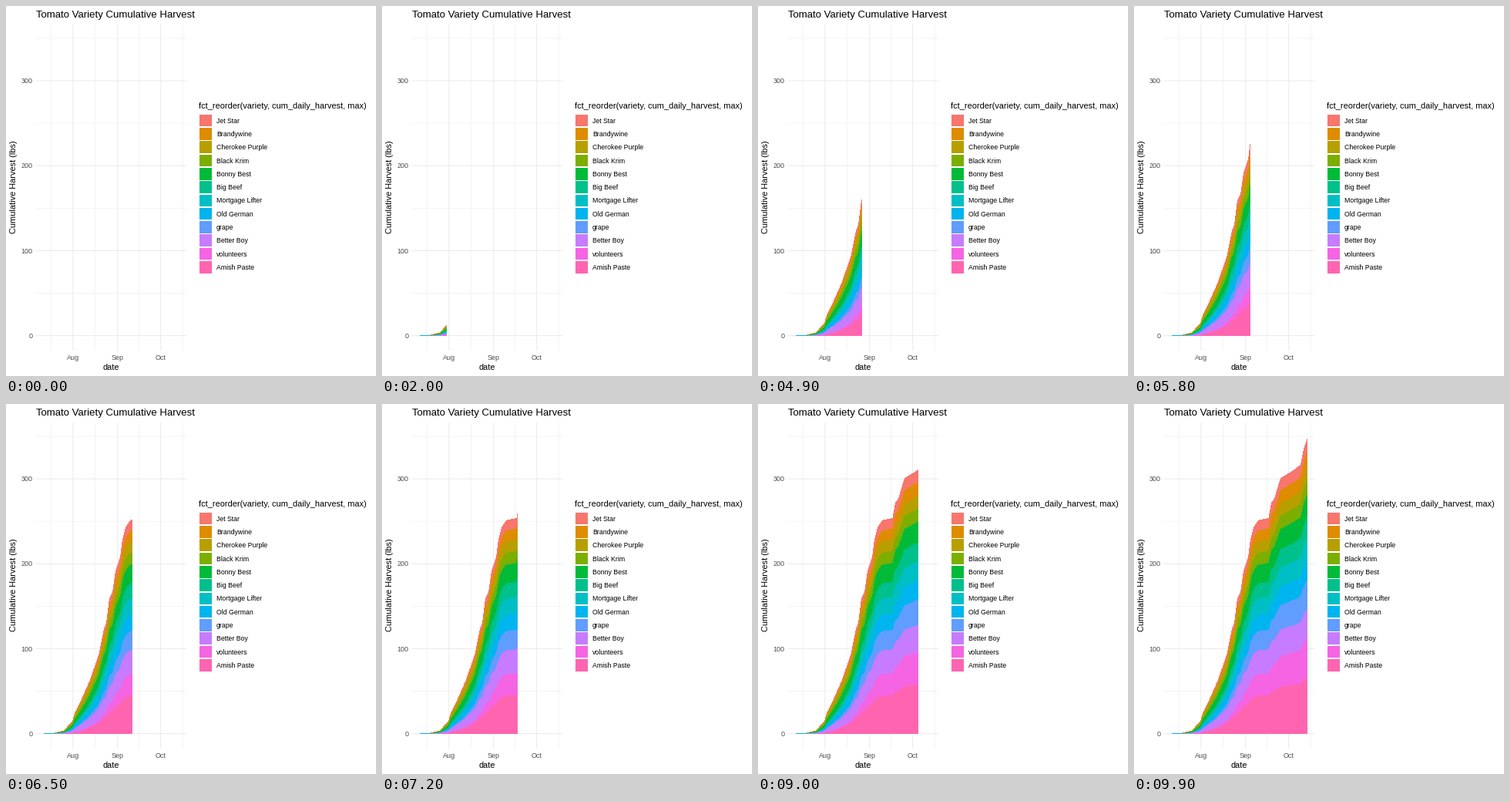
A matplotlib script for the animation above (10000 ms loop, 480 px wide and 480 px high).

```python
import matplotlib.pyplot as plt
import numpy as np
from matplotlib.animation import FuncAnimation
from matplotlib.patches import Rectangle

SIZE, DPI, FRAMES = 480, 100, 100
PT = 72 / DPI  # one pixel in points
LEFT, RIGHT, TOP, BOTTOM = 38.6, 233.9, 24, 447
START, SPAN = 48.6, 176.3
ZERO, PER_LB, FULL = 427.8, 1.1017, 349
GREY = "#4D4D4D"

# Colour, share of the final harvest in percent, and how late the variety
# ripens (negative is early); from the top of the stack to the bottom
VARIETIES = {
    "Jet Star": ("#F8766D", 4.5, -.1),
    "Brandywine": ("#DE8C00", 5.3, .15),
    "Cherokee Purple": ("#B79F00", 4.4, -.45),
    "Black Krim": ("#7CAE00", 4.8, -.35),
    "Bonny Best": ("#00BA38", 7.4, -.42),
    "Big Beef": ("#00C08B", 7.1, .1),
    "Mortgage Lifter": ("#00BFC4", 7.3, 0),
    "Old German": ("#00B4F0", 6.9, -.25),
    "grape": ("#619CFF", 9.9, .4),
    "Better Boy": ("#C77CFF", 9.8, -.3),
    "volunteers": ("#F564E3", 13.6, 1),
    "Amish Paste": ("#FF64B0", 19, .3),
}

# Key points (x, pounds) of the whole harvest
TOTAL = [
    (49, .9), (62, .9), (75, 4), (86, 15), (89, 24.3), (97, 39), (108, 61.5),
    (120, 92.4), (127, 124), (130, 130.5), (134, 159.6), (138, 166.5),
    (142, 192), (148, 207.7), (151, 229), (155, 243), (161, 251.5),
    (174.5, 254), (178, 272), (182, 277), (190, 301), (208, 311),
    (216, 317), (220, 335), (225, FULL),
]

plt.rcParams["font.family"] = "Liberation Sans"
fig = plt.figure(figsize=(SIZE / DPI, SIZE / DPI), dpi=DPI, facecolor="white")
ax = fig.add_axes([0, 0, 1, 1])
ax.axis("off")


def label(x, y, text, size, color="black", **kw):
    ax.text(x, y, text, fontsize=size * PT, color=color, va="baseline", **kw)


def grid(xs, pounds, width):
    style = dict(color="#EBEBEB", lw=width * PT, zorder=1, snap=False,
                 solid_capstyle="butt")
    for x in xs:
        ax.plot([x, x], [TOP, BOTTOM], **style)
    for lb in pounds:
        y = ZERO - .2 - lb * PER_LB
        ax.plot([LEFT, RIGHT], [y, y], **style)


def draw_axes():
    months = {"Aug": 86.8, "Sep": 144.7, "Oct": 200.7}
    grid((58, 115.7, 172.7, 229.6), (50, 150, 250, 350), .53)
    grid(months.values(), (0, 100, 200, 300), 1.07)
    for name, x in months.items():
        label(x, 459.3, name, 9, GREY, ha="center")
    for lb in (0, 100, 200, 300):
        label(34.3, ZERO + 3 - lb * PER_LB, lb, 9, GREY, ha="right")
    label(39, 15, "Tomato Variety Cumulative Harvest", 13.2)
    label(136.5, 472, "date", 11, ha="center")
    label(13, 235, "Cumulative Harvest (lbs)", 11, ha="center",
          rotation=90, rotation_mode="anchor")


def draw_legend():
    label(250, 133, "fct_reorder(variety, cum_daily_harvest, max)", 11)
    for i, (name, (color, *_)) in enumerate(VARIETIES.items()):
        y = 149 + 17.28 * i
        ax.add_patch(Rectangle((250.8, y - 8.1), 16.2, 15.6, fc=color, lw=0))
        label(273, y + 2.8, name, 8.8)


def layer_tops(columns):
    """Pixel row of each layer's top in every column, in legend order."""
    total = np.interp(columns + .5, *zip(*TOTAL))
    parts = np.array([share * (total / FULL) ** late
                      for _, share, late in VARIETIES.values()])
    parts *= total / parts.sum(axis=0)
    stacked = np.cumsum(parts[::-1], axis=0)[::-1]
    return np.round(ZERO - stacked * PER_LB)


draw_axes()
draw_legend()

edges = np.arange(49, 226)
columns = edges[:-1]
base = round(ZERO)
tops = layer_tops(columns)
# Each layer reaches down to zero and the next one covers its lower part
layers = [ax.stairs(top, edges, baseline=base, fill=True, color=color, lw=0,
                    zorder=2)
          for top, (color, *_) in zip(tops, VARIETIES.values())]
ax.set(xlim=(0, SIZE), ylim=(SIZE, 0))


def update(i):
    edge = int(START + SPAN * i / (FRAMES - 1) + .1)
    for layer, top in zip(layers, tops):
        layer.set_data(values=np.where(columns < edge, top, base))
    return layers


anim = FuncAnimation(fig, update, frames=FRAMES, interval=100, repeat=True)
plt.show()
```
